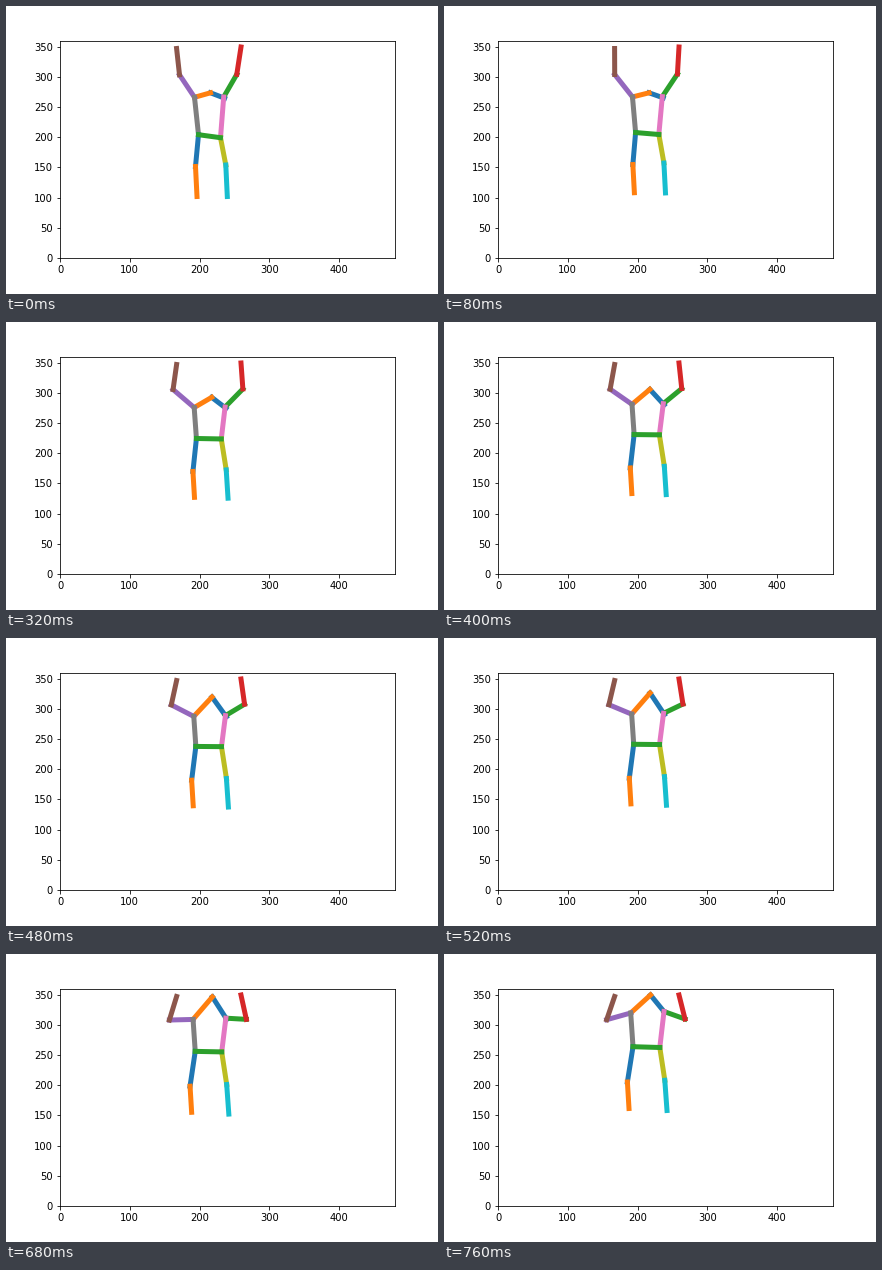
Recreate the animation shown at these times as a matplotlib script. Size 432 px wide and 288 px high, loop 0.8 s.

```python
import matplotlib.pyplot as plt
from matplotlib.animation import FuncAnimation

FRAMES, INTERVAL = 20, 40


def power(p):
    return lambda t: t ** p


def late_smooth(t):
    """Smoothstep that waits a little before it starts."""
    u = max(0, (t - 0.14) / 0.86)
    return u * u * (3 - 2 * u)


QUICK, STEADY, SLOW = power(0.6), power(1), power(2)

# Joint: start and end in stage pixels, easing of x, easing of y.
JOINTS = {
    "head": ((204.5, 86.8), (206.5, 41), QUICK, late_smooth),
    "r_shoulder": ((217.7, 91), (220, 57.5), QUICK, SLOW),
    "l_shoulder": ((188.5, 91.3), (186.7, 59), SLOW, SLOW),
    "r_elbow": ((230.8, 68.3), (241, 65), QUICK, STEADY),
    "l_elbow": ((173.5, 68.8), (162.7, 65.7), QUICK, STEADY),
    "r_wrist": ((235, 41), (235, 41), STEADY, STEADY),
    "l_wrist": ((170.6, 42.5), (170.6, 42.5), STEADY, STEADY),
    "r_hip": ((214.5, 131.7), (215.8, 93.5), QUICK, power(1.1)),
    "l_hip": ((192.5, 128.7), (189, 92.7), QUICK, power(1.25)),
    "r_knee": ((219.8, 159), (220.8, 126.3), STEADY, power(1.25)),
    "l_knee": ((189.5, 160.5), (183.4, 128), STEADY, power(1.25)),
    "r_ankle": ((221.3, 190.5), (223, 156.5), STEADY, STEADY),
    "l_ankle": ((191, 190.5), (185, 154.5), STEADY, STEADY),
}
BONES = [
    ("head", "collar"),
    ("head", "l_shoulder"),
    ("r_shoulder", "r_elbow"),
    ("r_elbow", "r_wrist"),
    ("l_shoulder", "l_elbow"),
    ("l_elbow", "l_wrist"),
    ("r_shoulder", "r_hip"),
    ("l_shoulder", "l_hip"),
    ("r_hip", "r_knee"),
    ("r_knee", "r_ankle"),
    ("l_hip", "l_knee"),
    ("l_knee", "l_ankle"),
    ("l_hip", "r_hip"),
]

plt.rcParams["font.family"] = "DejaVu Sans"
fig, ax = plt.subplots(figsize=(6, 4), dpi=72)
fig.subplots_adjust(left=0.125, right=0.9, bottom=0.125, top=0.88)
ax.set_xlim(0, 480)
ax.set_ylim(0, 360)
lines = [ax.plot([], [], lw=5)[0] for _ in BONES]


def to_data(x, y):
    """Stage pixels, y down, to axes units."""
    return (x - 54) * 480 / 334.8, (252 - y) * 360 / 217.44


def pose(t):
    joints = {}
    for name, ((x0, y0), (x1, y1), ease_x, ease_y) in JOINTS.items():
        joints[name] = (x0 + (x1 - x0) * ease_x(t),
                        y0 + (y1 - y0) * ease_y(t))
    # The collar bone reaches slightly past the shoulder.
    x, y = joints["r_shoulder"]
    joints["collar"] = x + 0.9, y + 1.2
    return {name: to_data(*point) for name, point in joints.items()}


def draw(step):
    joints = pose(step / (FRAMES - 1))
    for line, (start, end) in zip(lines, BONES):
        line.set_data(*zip(joints[start], joints[end]))
    return lines


anim = FuncAnimation(fig, draw, frames=FRAMES, interval=INTERVAL,
                     repeat=True, repeat_delay=0)
plt.show()
```
